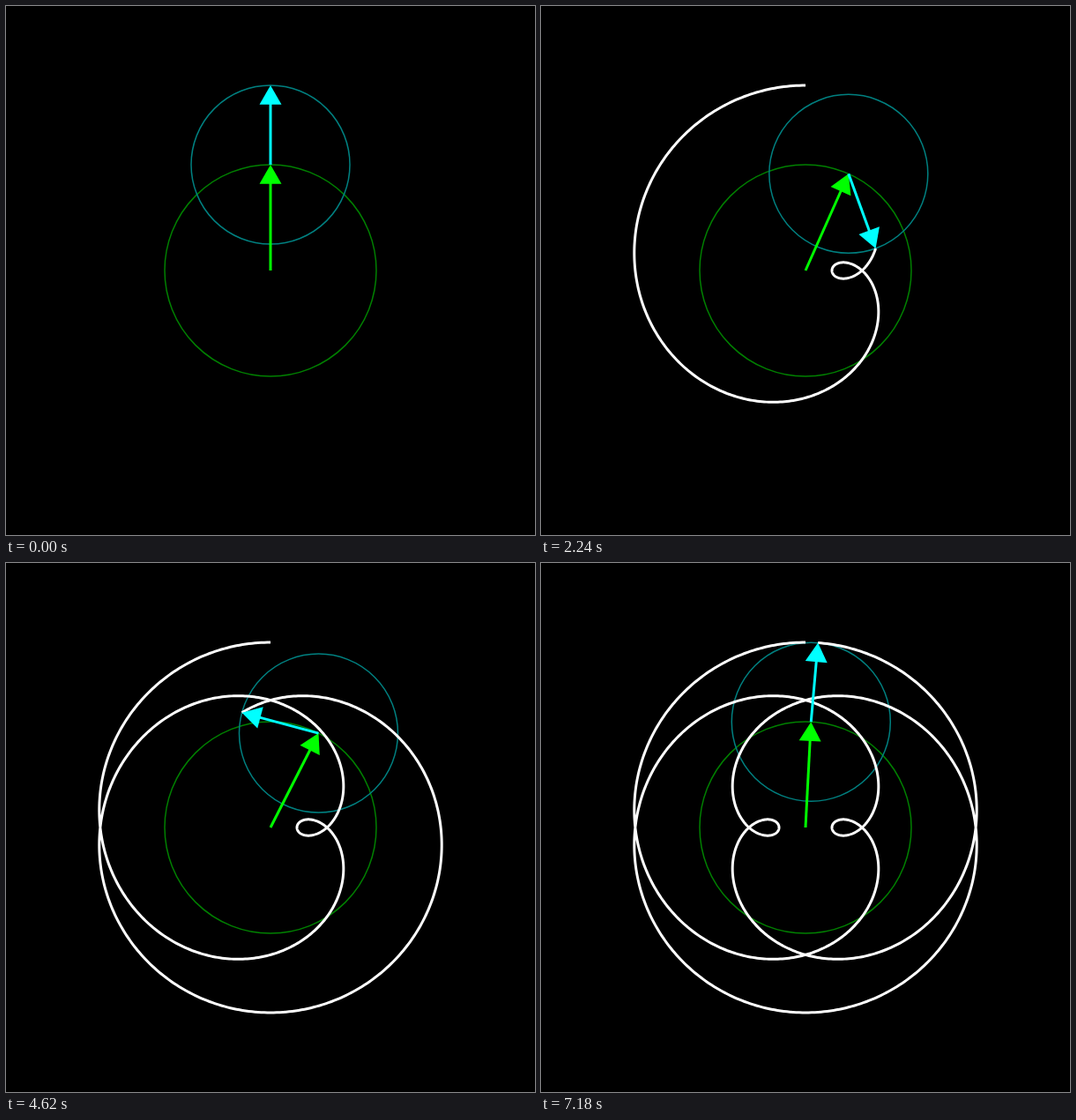
Write an HTML page with a canvas that moves like this. It is 600x600 px and loops after 7200 ms.

```html
<!DOCTYPE html>
<html lang="en">
<head>
<meta charset="utf-8">
<title>Two rotating arrows</title>
<style>
html, body { margin: 0; width: 100%; height: 100%; overflow: hidden; background: #000; }
canvas { display: block; }
</style>
</head>
<body>
<canvas id="stage" width="600" height="600"></canvas>
<script>
const ctx = document.getElementById('stage').getContext('2d');
const LOOP = 7200, STEP = 20, FRAMES = LOOP / STEP;
const HEAD = 25, HEAD_LEN = HEAD * Math.sqrt(3) / 2;
const CENTER = { x: 300, y: 300 };
const inner = { r: 120, turns: 3, color: '#0f0', dim: '#008000' };
const outer = { r: 90, turns: 5, color: '#0ff', dim: '#008080' };

// Arrows start upright and turn counterclockwise; p is the loop progress 0..1.
function tip(from, arm, p) {
  const a = 2 * Math.PI * arm.turns * p;
  return { x: from.x - arm.r * Math.sin(a), y: from.y - arm.r * Math.cos(a) };
}

function circle(c, arm) {
  ctx.strokeStyle = arm.dim;
  ctx.lineWidth = 1.5;
  ctx.beginPath();
  ctx.arc(c.x, c.y, arm.r, 0, 2 * Math.PI);
  ctx.stroke();
}

function trace(frame) {
  const n = frame * 4;
  ctx.strokeStyle = '#fff';
  ctx.lineWidth = 3;
  ctx.lineJoin = 'round';
  ctx.beginPath();
  for (let i = 0; i <= n; i++) {
    const p = i / (FRAMES * 4);
    const q = tip(tip(CENTER, inner, p), outer, p);
    ctx.lineTo(q.x, q.y);
  }
  ctx.stroke();
}

function arrow(from, arm, p) {
  ctx.save();
  ctx.translate(from.x, from.y);
  ctx.rotate(-2 * Math.PI * arm.turns * p);
  ctx.strokeStyle = ctx.fillStyle = arm.color;
  ctx.lineWidth = 3;
  ctx.beginPath();
  ctx.moveTo(0, 0);
  ctx.lineTo(0, HEAD_LEN - arm.r - 1);
  ctx.stroke();
  ctx.beginPath();
  ctx.moveTo(0, -arm.r);
  ctx.lineTo(HEAD / 2, HEAD_LEN - arm.r);
  ctx.lineTo(-HEAD / 2, HEAD_LEN - arm.r);
  ctx.fill();
  ctx.restore();
}

function draw(frame) {
  const p = frame / FRAMES;
  const joint = tip(CENTER, inner, p);
  ctx.fillStyle = '#000';
  ctx.fillRect(0, 0, 600, 600);
  circle(CENTER, inner);
  circle(joint, outer);
  if (frame) trace(frame);
  arrow(CENTER, inner, p);
  arrow(joint, outer, p);
}

const start = performance.now();
function tick() {
  const t = Math.max(0, performance.now() - start) % LOOP;
  draw(Math.floor(t / STEP));
  requestAnimationFrame(tick);
}
tick();
</script>
</body>
</html>
```
